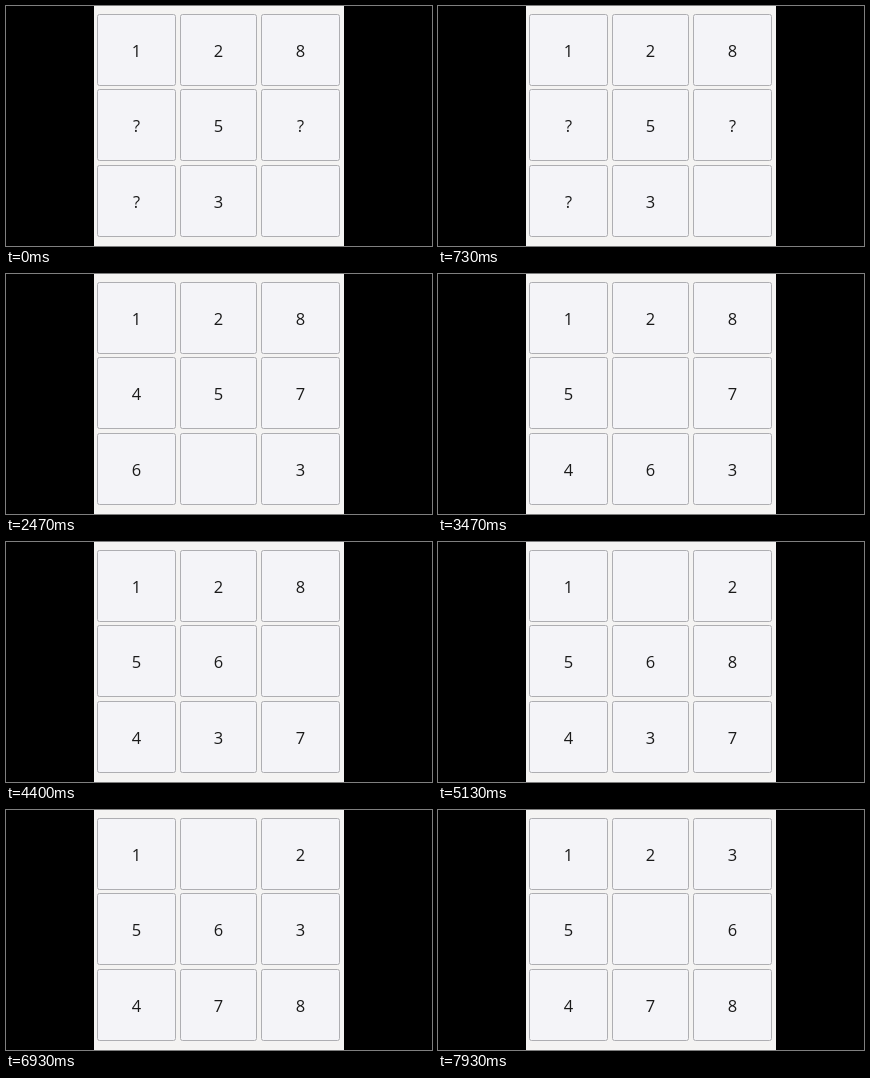
Write an HTML page that moves like this. It is 426 px wide and 240 px high and loops after 8 s.

```html
<!DOCTYPE html>
<html lang="en">
<head>
<meta charset="utf-8">
<title>Sliding puzzle</title>
<style>
  html, body { margin: 0; width: 100%; height: 100%; overflow: hidden; background: #000; }
  svg { display: block; width: 100vw; height: 100vh; }
  .panel { fill: #f4f3f2; }
  .tile { fill: #f4f4f8; stroke: #aeaeb2; stroke-width: 1; }
  text { font: 16.5px "Open Sans", "Noto Sans", sans-serif; fill: #1a1a1a; text-anchor: middle; }
</style>
</head>
<body>
<svg id="stage" viewBox="0 0 426 240">
  <rect class="panel" x="88" width="250" height="240"/>
</svg>
<script>
const LOOP = 8000;
const STEP = 322;          // time between two moves
const REVEAL = 1918;       // unknown tiles get their numbers
const HIDDEN = "128?5??3 ";
const START = "12845763 ";
const MOVES = "LLURDRUULDDRULURDL"; // path of the empty cell
const OFFSET = { L: -1, R: 1, U: -3, D: 3 };
const COLS = [{ x: 91.5, width: 78 }, { x: 174.5, width: 76 }, { x: 255.5, width: 78 }];
const ROWS = [8.5, 83.5, 159.5];
const HEIGHT = 71;
const BASELINE = 42.5;

const stage = document.getElementById("stage");

function add(name, attributes) {
  const node = document.createElementNS("http://www.w3.org/2000/svg", name);
  for (const key in attributes) node.setAttribute(key, attributes[key]);
  return stage.appendChild(node);
}

function slide(board, move) {
  const cells = [...board];
  const from = cells.indexOf(" ");
  const to = from + OFFSET[move];
  [cells[from], cells[to]] = [cells[to], cells[from]];
  return cells.join("");
}

const labels = ROWS.flatMap(y => COLS.map(({ x, width }) => {
  add("rect", { class: "tile", x, y, width, height: HEIGHT, rx: 2 });
  return add("text", { x: x + width / 2, y: y + BASELINE });
}));

const boards = [START];
for (const move of MOVES) boards.push(slide(boards.at(-1), move));

function boardAt(time) {
  if (time < REVEAL) return HIDDEN;
  const index = Math.floor((time - REVEAL) / STEP);
  return boards[Math.min(index, boards.length - 1)];
}

const begin = performance.now();
let shown = "";

function draw() {
  const board = boardAt((performance.now() - begin) % LOOP);
  if (board !== shown) {
    labels.forEach((label, i) => { label.textContent = board[i]; });
    shown = board;
  }
  requestAnimationFrame(draw);
}
draw();
</script>
</body>
</html>
```
